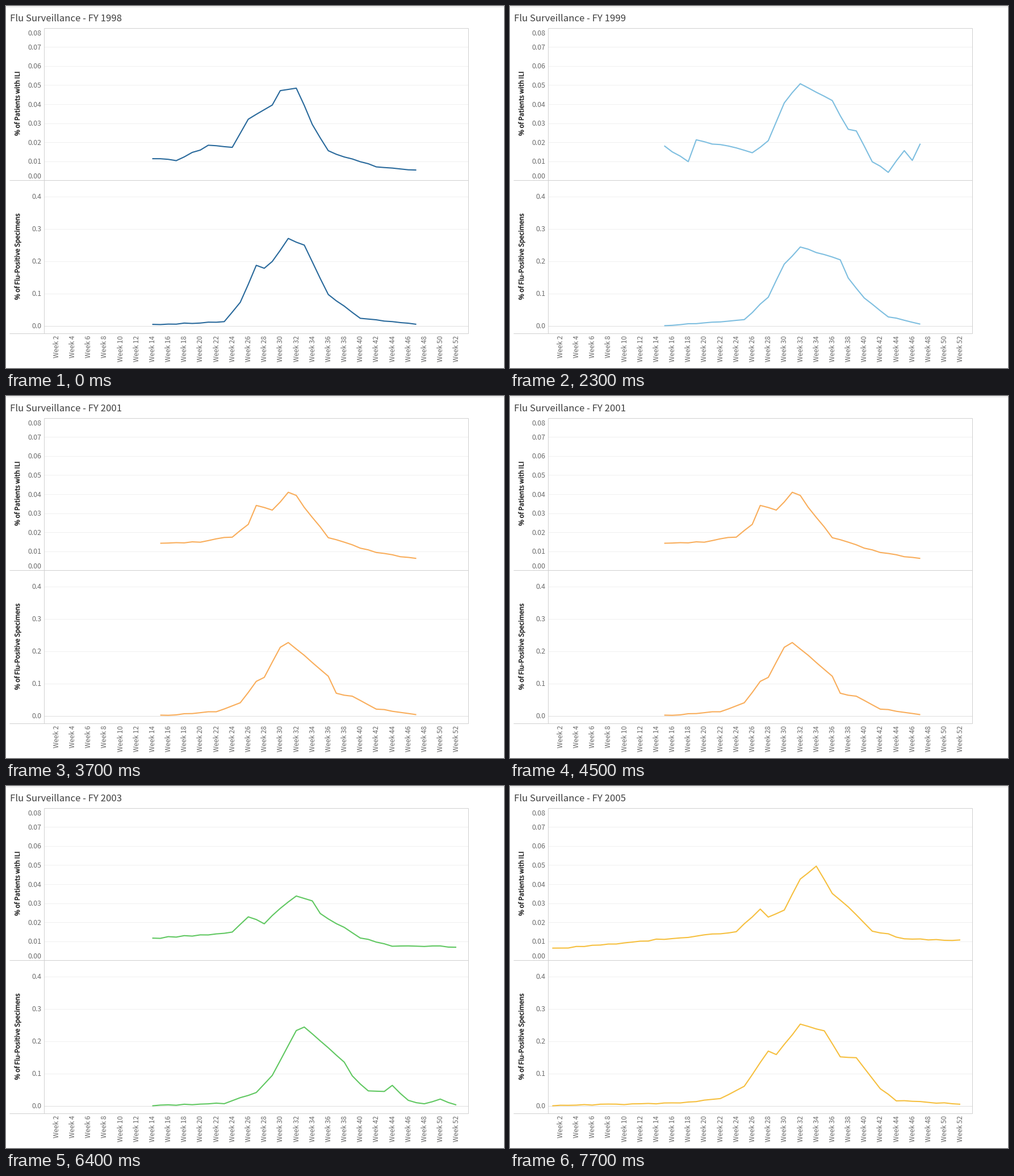
These frames come from a looping animation (877 by 638 pixels, 8 s). A matplotlib script:

```python
import numpy as np
import matplotlib.pyplot as plt
from matplotlib.animation import FuncAnimation
from matplotlib.patheffects import withStroke

WIDTH, HEIGHT, DPI = 877, 638, 100
STEP, LOOP = 100, 8000
SEASON_TIME, LEAD_IN = 1020, 560
FIRST_YEAR = 1998
LEFT, RIGHT, TOP, MIDDLE, BOTTOM = 66.5, 813.5, 38.5, 306.5, 576.5
TICK, DARK, GRID, FRAME = "#6c6c6c", "#2a2a2a", "#f0f0f0", "#d0d0d0"

plt.rcParams["font.family"] = ["Noto Sans CJK JP", "Liberation Sans"]


def week_x(week):
    return 60.3 + 14.09 * np.asarray(week)


def ili_y(share):
    return 307.4 - 3360 * np.asarray(share)


def specimen_y(share):
    return 563.7 - 570 * np.asarray(share)


rng = np.random.default_rng(7)
seasons = []


def weekly(turns, jitter):
    """Join the turning points {week: value} and add a slight weekly wobble."""
    weeks = np.arange(min(turns), max(turns) + 1)
    values = np.interp(weeks, list(turns), list(turns.values()))
    values += rng.uniform(-jitter, jitter, len(weeks))
    return weeks, np.maximum(values, 0)


def add_season(color, ili, positive):
    """Turning points: ILI share in 1/10000, positive specimens in 1/1000."""
    weeks, patients = weekly(ili, 4)
    _, specimens = weekly(positive, 1.5)
    seasons.append((color, week_x(weeks),
                    ili_y(patients / 1e4), specimen_y(specimens / 1e3)))


add_season("#2a6a9c",
           {14: 113, 17: 106, 21: 182, 24: 175, 26: 323, 29: 395, 30: 467,
            32: 483, 34: 296, 36: 155, 42: 70, 47: 57},
           {14: 4, 23: 12, 25: 72, 27: 187, 28: 178, 29: 198, 31: 270,
            33: 250, 36: 96, 40: 23, 47: 6})
add_season("#7fbfe0",
           {15: 178, 18: 100, 19: 210, 23: 177, 26: 148, 28: 205, 30: 409,
            32: 506, 36: 421, 38: 265, 39: 260, 41: 99, 43: 46, 45: 160,
            46: 108, 47: 189},
           {15: 0, 25: 18, 28: 90, 30: 190, 32: 244, 37: 204, 38: 147,
            40: 87, 43: 28, 47: 6})
add_season("#f57f0e",
           {15: 98, 16: 160, 21: 150, 23: 183, 25: 281, 27: 535, 28: 525,
            29: 388, 31: 233, 34: 136, 39: 92, 43: 52, 47: 40},
           {15: 11, 18: 24, 22: 102, 23: 162, 24: 152, 26: 236, 27: 258,
            31: 125, 33: 114, 36: 46, 39: 14, 47: 0})
add_season("#f9ae5c",
           {15: 140, 21: 154, 24: 178, 26: 243, 27: 344, 29: 314, 31: 407,
            32: 391, 34: 276, 36: 174, 42: 93, 47: 60},
           {15: 1, 22: 13, 25: 40, 27: 107, 28: 120, 30: 211, 31: 227,
            33: 187, 36: 123, 37: 70, 39: 60, 42: 22, 47: 5})
add_season("#2a942f",
           {14: 107, 21: 150, 24: 131, 26: 210, 28: 165, 30: 301, 34: 318,
            36: 225, 41: 98, 46: 62},
           {14: 3, 19: 9, 25: 47, 27: 71, 29: 162, 31: 204, 34: 229,
            36: 203, 39: 129, 42: 102, 43: 72, 44: 93, 46: 54})
add_season("#61c862",
           {14: 115, 24: 147, 26: 232, 28: 189, 30: 275, 32: 340, 34: 316,
            35: 246, 40: 120, 44: 76, 52: 72},
           {14: 0, 23: 8, 27: 42, 29: 93, 32: 232, 33: 243, 38: 136, 39: 92,
            41: 45, 43: 45, 44: 62, 46: 17, 48: 5, 50: 20, 52: 2})
add_season("#b5891f",
           {1: 65, 14: 105, 19: 190, 21: 290, 24: 510, 26: 765, 28: 350,
            30: 240, 36: 150, 52: 65},
           {1: 3, 14: 10, 18: 80, 22: 300, 24: 360, 26: 310, 28: 160,
            30: 90, 34: 30, 52: 5})
add_season("#f6c040",
           {1: 62, 9: 88, 20: 132, 24: 152, 27: 266, 28: 226, 30: 262,
            32: 428, 34: 495, 36: 354, 39: 242, 41: 156, 45: 116, 52: 105},
           {1: 1, 16: 8, 22: 21, 25: 60, 28: 169, 29: 159, 32: 252, 35: 231,
            37: 152, 39: 150, 42: 53, 44: 16, 52: 6})


def points(pixels):
    return pixels * 72 / DPI


fig = plt.figure(figsize=(WIDTH / DPI, HEIGHT / DPI), dpi=DPI, facecolor="white")
ax = fig.add_axes([0, 0, 1, 1])
ax.set_xlim(0, WIDTH)
ax.set_ylim(HEIGHT, 0)
ax.axis("off")


def rule(x0, y0, x1, y1, color):
    ax.plot([x0, x1], [y0, y1], color=color, lw=points(1), snap=True,
            solid_capstyle="butt", zorder=1)


def label(x, y, text, size, color, ha="left", rotation=0):
    return ax.text(x, y, text, fontsize=points(size), color=color, ha=ha,
                   va="baseline", rotation=rotation, rotation_mode="anchor")


def axis_title(y, text):
    # A thin outline gives the medium weight.
    label(24, y, text, 11.6, DARK, "center", 90).set_path_effects(
        [withStroke(linewidth=points(0.45), foreground=DARK)])


for i in range(9):
    y = float(ili_y(i / 100))
    if 0 < i < 8:
        rule(LEFT, y, RIGHT, y, GRID)
    # The outermost labels are pulled inside the panel.
    label(62.3, np.clip(y, 47, 299) + 4.5, f"{i / 100:.2f}", 12.3, TICK, "right")

for i in range(5):
    y = float(specimen_y(i / 10))
    rule(LEFT, y, RIGHT, y, GRID if i else "#dedede")
    label(62.3, y + 4.5, f"{i / 10:.1f}", 12.3, TICK, "right")

for week in range(2, 53, 2):
    label(week_x(week) + 4.4, 581, f"Week {week}", 11.8, TICK, "right", 90)

rule(0, 0.5, WIDTH, 0.5, "#dadada")
rule(LEFT, TOP, RIGHT, TOP, FRAME)
for y in (MIDDLE, BOTTOM):
    rule(6, y, RIGHT, y, FRAME)
for x in (LEFT, RIGHT):
    rule(x, TOP, x, BOTTOM, FRAME)

axis_title(171.8, "% of Patients with ILI")
axis_title(441.8, "% of Flu-Positive Specimens")
title = label(7, 26.8, "", 16.75, "#404040")

curves = [ax.plot([], [], lw=points(2.1), solid_joinstyle="round",
                  solid_capstyle="butt", zorder=3)[0] for _ in range(2)]


def draw(frame):
    index = max(0, (frame * STEP - LEAD_IN) // SEASON_TIME)
    color, xs, *series = seasons[index]
    title.set_text(f"Flu Surveillance - FY {FIRST_YEAR + index}")
    for curve, ys in zip(curves, series):
        curve.set_data(xs, ys)
        curve.set_color(color)
    return [title, *curves]


animation = FuncAnimation(fig, draw, frames=LOOP // STEP, interval=STEP,
                          repeat=True, repeat_delay=0)
plt.show()
```
